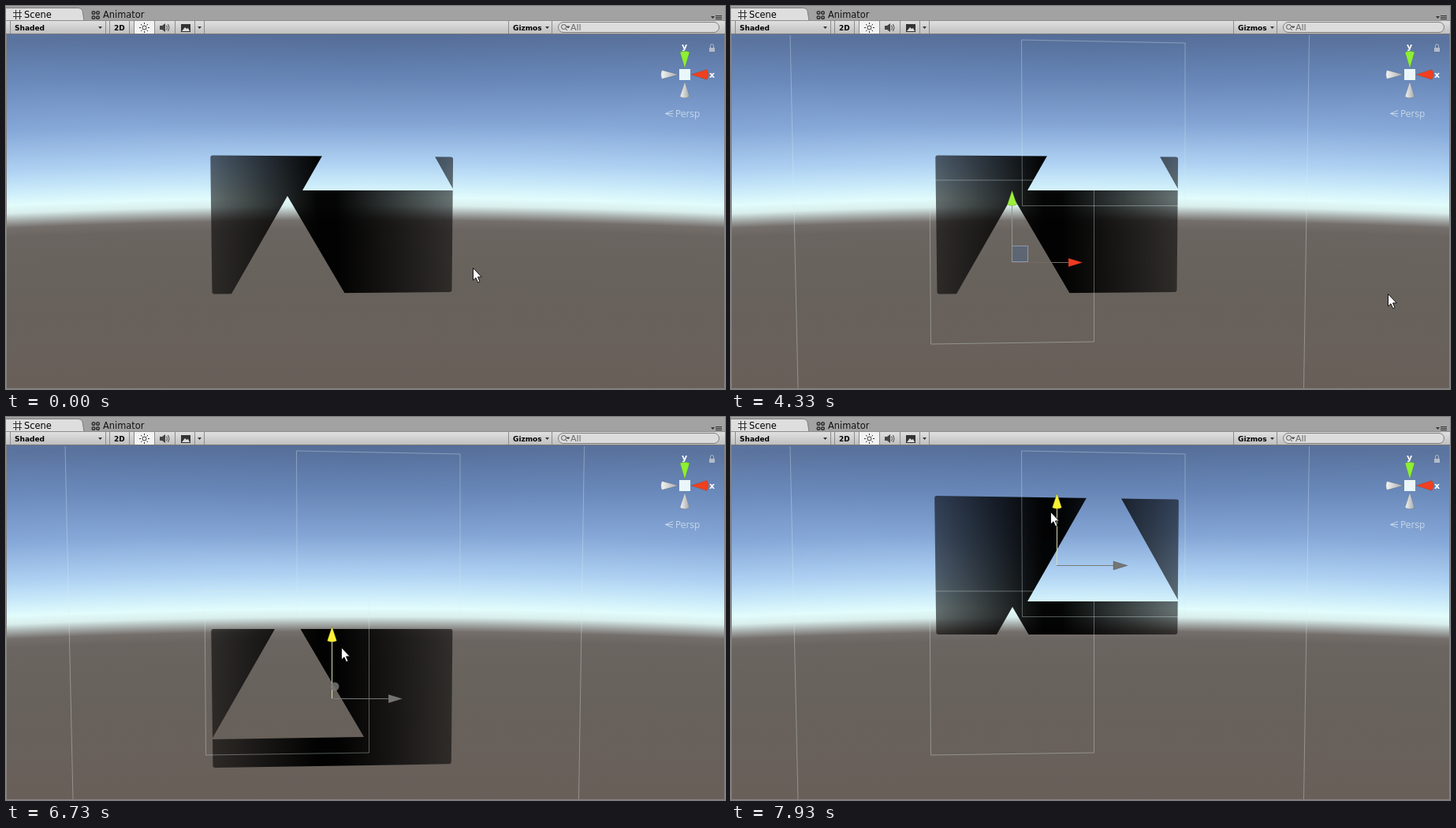
An HTML page for the animation above (8000 ms loop, 912 px wide and 486 px high).

```html
<!DOCTYPE html>
<html lang="en">
<head>
<meta charset="utf-8">
<title>Scene view</title>
<style>
  html, body { margin: 0; width: 100%; height: 100%; overflow: hidden; background: #a2a2a2; }
  svg { display: block; width: 912px; height: 486px; font: 11.4px "DejaVu Sans", sans-serif; }
  .bold { font-weight: bold; font-size: 9px; }
  .frames { fill: none; stroke: #dcebeb; stroke-opacity: .36; }
  #gizmo { --up: #9cf03c; --side: #ee3a20; --upLine: #92978c; --sideLine: #776966; }
  #gizmo.sky { --upLine: #a4b944; --sideLine: #dc5648; }
  #gizmo.hot { --up: #fbf235; --upLine: #d9dcb0; }
  #gizmo.drag { --side: #737573; --sideLine: #777a78; }
  #gizmo .sky-only, #gizmo .drag-only, #gizmo.sky .plane, #gizmo.drag .plane { display: none; }
  #gizmo.sky .sky-only, #gizmo.drag.low .drag-only { display: inline; }
</style>
</head>
<body>
<svg viewBox="0 0 912 486">
  <defs>
    <radialGradient id="sky" gradientUnits="userSpaceOnUse" cx="456" cy="10686" r="10650" fr="10200">
      <stop offset="0" stop-color="#695f59"/>
      <stop offset=".3" stop-color="#68625c"/>
      <stop offset=".45" stop-color="#6b6561"/>
      <stop offset=".476" stop-color="#756f6c"/>
      <stop offset=".497" stop-color="#a7aeac"/>
      <stop offset=".517" stop-color="#d8eeec"/>
      <stop offset=".54" stop-color="#e2fcfc"/>
      <stop offset=".575" stop-color="#cdedfa"/>
      <stop offset=".64" stop-color="#add0f2"/>
      <stop offset=".75" stop-color="#86a8d8"/>
      <stop offset=".88" stop-color="#6b8bbd"/>
      <stop offset="1" stop-color="#5b749f"/>
    </radialGradient>
    <radialGradient id="zenith" gradientUnits="userSpaceOnUse" cx="456" cy="36" r="460" gradientTransform="translate(0 24) scale(1 .34)">
      <stop offset="0" stop-color="#25395f" stop-opacity=".13"/>
      <stop offset="1" stop-color="#25395f" stop-opacity="0"/>
    </radialGradient>
    <linearGradient id="shade" gradientUnits="userSpaceOnUse" x1="259" x2="568" y1="0" y2="0">
      <stop offset="0" stop-opacity=".56"/>
      <stop offset=".44" stop-opacity=".98"/>
      <stop offset=".52" stop-opacity=".98"/>
      <stop offset="1" stop-opacity=".54"/>
    </linearGradient>
    <linearGradient id="bar" x2="0" y2="1">
      <stop stop-color="#e0e0e0"/><stop offset="1" stop-color="#bebebe"/>
    </linearGradient>
    <linearGradient id="metal" x2="1" y2="0">
      <stop stop-color="#f4f4f4"/><stop offset="1" stop-color="#a4a8aa"/>
    </linearGradient>
    <mask id="cutout" maskUnits="userSpaceOnUse" x="0" y="36" width="912" height="450">
      <path id="panel" fill="#fff" stroke="#fff" stroke-width="5" stroke-linejoin="round"/>
      <path d="M357 241 454 406 261 409ZM473 64 568 234H376Z"/>
    </mask>
  </defs>

  <!-- tabs -->
  <path fill="#a2a2a2" d="M0 0H912V36H0Z"/>
  <path fill="#dedede" stroke="#7b7b7b" d="M-1 18.500V2.500H92Q96 2.500 97 6L99 18.500"/>
  <path stroke="#333" d="M9 8.500H20M9 13.500H20M12.500 5V17M17.500 5V17"/>
  <text x="23" y="15">Scene</text>
  <g fill="none" stroke="#333" stroke-width="1.500">
    <circle cx="111" cy="8.500" r="1.800"/><circle cx="116.500" cy="8.500" r="1.800"/>
    <circle cx="111" cy="14.500" r="1.800"/><circle cx="116.500" cy="14.500" r="1.800"/>
  </g>
  <text x="123" y="15" fill="#111">Animator</text>
  <path fill="#333" d="M894 13H899L896.500 16Z"/>
  <path stroke="#333" d="M900 12.500H908M900 14.500H908M900 16.500H908"/>

  <!-- toolbar -->
  <path fill="url(#bar)" d="M0 19H912V36H0Z"/>
  <path fill="#f3f3f3" d="M163 19H188V35H163Z"/>
  <path stroke="#8c8c8c" d="M5.500 19V35M126.500 19V35M131.500 19V35M156.500 19V35M162.500 19V35M188.500 19V35M214.500 19V35M239.500 19V35M251.500 19V35M637.500 19V35M692.500 19V35M0 18.500H912"/>
  <path stroke="#777" d="M0 35.500H912"/>
  <g class="bold">
    <text x="11" y="31">Shaded</text><text x="137" y="31">2D</text><text x="643" y="31">Gizmos</text>
  </g>
  <path fill="#333" d="M117 26H122L119.500 29ZM243 26H248L245.500 29ZM684 26H689L686.500 29Z"/>
  <circle cx="175.500" cy="27.500" r="2.500" fill="none" stroke="#333"/>
  <path stroke="#333" d="M175.500 21V23M175.500 32V34M169 27.500H171M180 27.500H182M171 23 172.500 24.500M180 23 178.500 24.500M171 32 172.500 30.500M180 32 178.500 30.500"/>
  <path fill="#444" d="M195 25H198L202 22V33L198 30H195Z"/>
  <path fill="none" stroke="#444" d="M203.500 24.500Q205.500 27.500 203.500 30.500M205.500 23Q208.500 27.500 205.500 32"/>
  <path fill="#333" d="M222 23H234V33H222Z"/>
  <path fill="#ddd" d="M223 32 227 27 229 29 231 28 233 32Z"/>
  <rect x="700.500" y="20.500" width="204" height="13" rx="6.500" fill="#dcdcdc" stroke="#7d7d7d"/>
  <circle cx="707.500" cy="26.500" r="3" fill="none" stroke="#555"/>
  <path fill="#555" stroke="#555" d="M710 29 712 31M711 26H715L713 28Z"/>
  <text x="716" y="30.500" fill="#666" font-size="11">All</text>

  <!-- scene -->
  <path fill="url(#sky)" d="M0 36H912V486H0Z"/>
  <path fill="url(#zenith)" d="M0 36H912V200H0Z"/>
  <path fill="url(#shade)" mask="url(#cutout)" d="M250 36H580V486H250Z"/>
  <path fill="none" stroke="#85817e" d="M0 485.500H911.500V36M.5 36V485"/>

  <g id="selection">
    <path class="frames" d="M75 37 85 485M733.500 37 726.500 485M252 221H460.500V426L253.500 429ZM368.500 43 576 47V253.500H369.500Z"/>
    <g id="gizmo">
      <g class="plane">
        <path fill="#4a6a96" fill-opacity=".38" stroke="#8b9cab" d="M.5-.5V-20.500H20.500V-.5Z"/>
      </g>
      <g class="sky-only">
        <path fill="#3f70d0" fill-opacity=".58" stroke="#668ed2" d="M-20.500-4.500H.5V20.500H-20.500ZM-20.500-.5H.5"/>
        <circle cx="-5" cy="12" r="4.500" fill="#2d477c" fill-opacity=".75"/>
      </g>
      <path stroke="var(--upLine)" d="M.5 0V-72"/>
      <path stroke="var(--sideLine)" d="M0 .5H72"/>
      <path fill="var(--up)" stroke="#2c301c" stroke-opacity=".4" stroke-width=".6" d="M.5-91 6.500-73Q.5-70-5.500-73Z"/>
      <path fill="var(--side)" stroke="#302020" stroke-opacity=".4" stroke-width=".6" d="M90 .5 72-5V6Z"/>
      <g class="sky-only">
        <ellipse cx=".5" cy="-73.500" rx="6" ry="2.500" fill="#101508"/>
        <ellipse cx="72.500" cy=".5" rx="2.500" ry="6" fill="#1c0906"/>
      </g>
      <circle class="drag-only" cx="4" cy="-15" r="5.500" fill="#777" fill-opacity=".85"/>
    </g>
  </g>

  <!-- orientation widget -->
  <path fill="#eaf6f9" d="M854 80H868V94H854Z"/>
  <g stroke="#444" stroke-opacity=".35" stroke-width=".6">
    <path fill="#8df032" d="M861 79 855 58.500Q861 56 867 58.500Z"/>
    <path fill="#f0401f" d="M869 87 889 80.500Q893 87 889 93.500Z"/>
    <path fill="url(#metal)" d="M853 87 832 92.500Q829.500 87 832 81.500Z"/>
    <path fill="url(#metal)" d="M861 96 867 115Q861 118.500 855 115Z"/>
  </g>
  <g fill="#fff" font-weight="bold" font-size="11">
    <text x="857" y="55">y</text><text x="892" y="91">x</text>
  </g>
  <path fill="none" stroke="#b3bcc8" d="M893.500 53V50.500Q893.500 48.500 895.500 48.500T897.500 50.500V53"/>
  <path fill="#b3bcc8" d="M892 53H899V58H892Z"/>
  <g fill="#d3e0ee" fill-opacity=".8">
    <path fill="none" stroke="#d3e0ee" stroke-opacity=".85" d="M846 132.500 836.500 136.500 846 140.500M836.500 136.500H846"/>
    <text x="849" y="141">Persp</text>
  </g>

  <path id="cursor" fill="#fff" stroke="#111" d="M.5.500V16L4 12.800 6.600 18.800 9 17.700 6.500 11.900H11.300Z"/>
</svg>
<script>
const FPS = 15, FRAMES = 120;
const $ = id => document.getElementById(id);

// Keys are [frame, ...values]; each path is visible from its first to its last key.
const cursorPaths = [
  [[0, 592, 332], [1, 581, 350], [2, 739, 413]],
  [[37, 832, 328], [39, 690, 235], [41, 593, 160], [43, 605, 140], [46, 832, 230]],
  [[65, 833, 365], [67, 518, 204], [69, 833, 260]],
  [[82, 818, 263], [85, 640, 245], [88, 500, 222], [92, 425, 208], [94, 421, 207],
   [101, 425, 292], [106, 425, 307], [107, 425, 307], [112, 424, 225], [119, 405, 120]],
];
const panelHeights = [[0, 277.5], [94, 277.5], [101, 357], [106, 375], [107, 375], [112, 309.5], [119, 188]];

function sample(keys, frame) {
  const i = Math.max(1, keys.findIndex(k => k[0] >= frame));
  const [f0, ...a] = keys[i - 1], [f1, ...b] = keys[i];
  return a.map((v, j) => v + (b[j] - v) * (frame - f0) / (f1 - f0));
}

// Slight perspective: the right side is a little smaller around the horizon.
function panelPath(y) {
  const left = v => `${260.5 + (v - 90) * .0125} ${v}`;
  const right = v => `${565.5 - (v - 90) * .009} ${270 + (v - 270) * .973}`;
  const top = y - 85.5, bottom = y + 85.5;
  return `M${left(top)}L${right(top)} ${right(bottom)} ${left(bottom)}Z`;
}

function draw(now) {
  const frame = Math.floor((now % 8000 + 4) * FPS / 1000) % FRAMES;
  const [y] = sample(panelHeights, frame);
  $('panel').setAttribute('d', panelPath(y));

  $('selection').style.display = frame < 30 ? 'none' : '';
  const [gx, gy] = frame < 60 ? [473, 150] : frame < 80 ? [356, 325] : [413, Math.round(y - .5)];
  const gizmo = $('gizmo');
  gizmo.setAttribute('transform', `translate(${gx} ${gy})`);
  gizmo.classList.toggle('sky', frame < 60);
  gizmo.classList.toggle('hot', frame >= 93);
  gizmo.classList.toggle('drag', frame >= 95);
  gizmo.classList.toggle('low', y > 330);

  const path = cursorPaths.find(p => frame >= p[0][0] && frame <= p.at(-1)[0]);
  $('cursor').style.display = path ? '' : 'none';
  if (path) $('cursor').setAttribute('transform', `translate(${sample(path, frame).map(Math.round)})`);
}

const start = performance.now();
function tick() {
  draw(performance.now() - start);
  requestAnimationFrame(tick);
}
tick();
</script>
</body>
</html>
```
